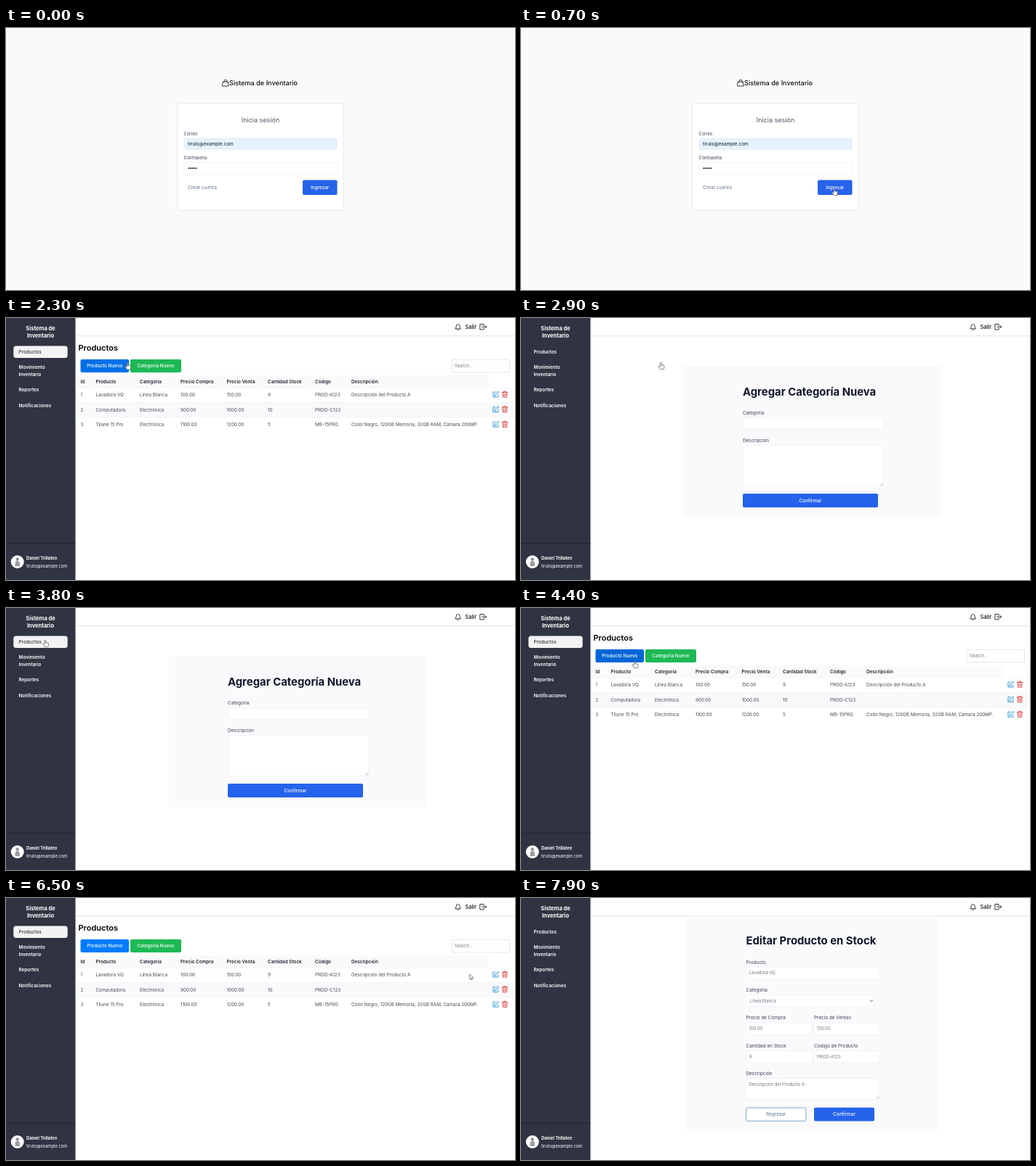
Write an HTML page that moves like this. It is 700 px wide and 361 px high and loops after 8 s.

```html
<!DOCTYPE html>
<html lang="es">
<head>
<meta charset="utf-8">
<title>Sistema de Inventario</title>
<style>
  html, body { margin: 0; width: 100%; height: 100%; overflow: hidden; background: #fff; }
  svg { display: block; width: 100%; height: 100%; }
  text { font: 400 6.3px Inter, "Open Sans", sans-serif; fill: #444a55; white-space: pre; }
  .label { font-size: 6.4px; fill: #374151; }
  .small { font-size: 5.7px; font-weight: 500; fill: #4b5563; }
  .value { font-size: 5.95px; fill: #717784; }
  .head { font-size: 6.35px; font-weight: 600; fill: #1f2430; }
  .title { font-size: 14.85px; font-weight: 700; fill: #0f172a; }
  .page-title { font-size: 11px; font-weight: 600; fill: #000; }
  .brand { font-size: 9.15px; font-weight: 500; fill: #111; }
  .welcome { font-size: 9px; fill: #4b5563; }
  .side { font-size: 7.5px; font-weight: 700; fill: #fff; }
  .nav { font-size: 6.4px; font-weight: 600; fill: #fff; }
  .nav.dark { font-weight: 500; fill: #333; }
  .user { font-size: 5.8px; font-weight: 700; fill: #fff; }
  .mail { font-size: 5.85px; fill: #fff; }
  .login { font-size: 6.5px; fill: #111827; }
  .muted { font-size: 6.5px; fill: #64748b; }
  .back { font-size: 6.4px; fill: #5b7590; }
  .button { font-size: 6.4px; font-weight: 500; fill: #fff; }
  .exit { font-size: 7.4px; font-weight: 500; fill: #111; }
  .mid { text-anchor: middle; }
  .field { fill: #fff; stroke: #e9ebef; stroke-width: .6; }
  .line { fill: none; stroke: #222; stroke-width: .9; stroke-linecap: round; stroke-linejoin: round; }

  /* One loop is 8 s, so 1.25% is 100 ms. */
  .login-page, .shell, .products, .category, .add, .edit, .pointer, .look, .hover, .new-product {
    animation: 8s -5ms step-end infinite;
  }
  .login-page { animation-name: login-page; }
  .shell { animation-name: shell; }
  .products { animation-name: products; }
  .category { animation-name: category; }
  .add { animation-name: add; }
  .edit { animation-name: edit; }
  .hover { animation-name: hover; }
  .new-product { animation-name: new-product; }
  .pointer { animation-name: move; }
  .look { animation-name: look, seen; }
  .hand { opacity: var(--hand); }
  .arrow { opacity: calc(1 - var(--hand)); }

  @keyframes login-page { 0% { visibility: visible } 11.25%, 100% { visibility: hidden } }
  @keyframes shell { 0% { visibility: hidden } 11.25%, 100% { visibility: visible } }
  @keyframes products {
    0%, 36.25%, 62.5%, 91.25%, 100% { visibility: hidden }
    11.25%, 53.75%, 73.75% { visibility: visible }
  }
  @keyframes category { 0%, 53.75%, 100% { visibility: hidden } 36.25% { visibility: visible } }
  @keyframes add { 0%, 73.75%, 100% { visibility: hidden } 62.5% { visibility: visible } }
  @keyframes edit { 0% { visibility: hidden } 91.25%, 100% { visibility: visible } }
  @keyframes hover {
    0%, 47.5%, 71.25% { opacity: 1 }
    36.25%, 62.5%, 91.25%, 100% { opacity: 0 }
    43.75%, 68.75% { opacity: 0; animation-timing-function: linear }
  }
  @keyframes new-product {
    0%, 30%, 73.75%, 100% { fill: #007bff }
    17.5% { fill: #007bff; animation-timing-function: steps(3) }
    21.25%, 57.5% { fill: #0056b3 }
    26.25% { fill: #0056b3; animation-timing-function: steps(3) }
    53.75% { fill: #0071ea; animation-timing-function: steps(1) }
    55% { fill: #0066d6; animation-timing-function: steps(2) }
  }
  @keyframes move {
    0% { transform: translate(330px, 196px); animation-timing-function: steps(6) }
    7.5% { transform: translate(431px, 221px) }
    13.75% { transform: translate(431px, 221px); animation-timing-function: steps(5) }
    20% { transform: translate(134.5px, 60px); animation-timing-function: steps(4) }
    25% { transform: translate(142px, 62px); animation-timing-function: steps(6) }
    32.5% { transform: translate(192.5px, 61px) }
    38.75% { transform: translate(192.5px, 61px); animation-timing-function: steps(5) }
    45% { transform: translate(54px, 44px) }
    52.5% { transform: translate(54px, 44px); animation-timing-function: steps(2) }
    55% { transform: translate(156.5px, 73px); animation-timing-function: steps(4) }
    60% { transform: translate(138px, 65px) }
    63.75% { transform: translate(138px, 65px); animation-timing-function: steps(6) }
    71.25% { transform: translate(66.5px, 49px) }
    72.5% { transform: translate(66.5px, 49px); animation-timing-function: steps(7) }
    81.25% { transform: translate(637.5px, 104.5px); animation-timing-function: steps(2) }
    83.75% { transform: translate(671px, 104px); animation-timing-function: steps(2) }
    86.25% { transform: translate(673px, 104px) }
    92.5% { transform: translate(673px, 104px); animation-timing-function: steps(4) }
    97.5%, 100% { transform: translate(380px, 215px) }
  }
  @keyframes look {
    0%, 11.25%, 40%, 53.75%, 65%, 73.75%, 93.75%, 100% { --hand: 0 }
    6.25%, 17.5%, 43.75%, 55%, 68.75%, 83.75% { --hand: 1 }
  }
  @keyframes seen { 0%, 98.75%, 100% { opacity: 0 } 1.25% { opacity: 1 } }
</style>
</head>
<body>
<svg id="stage" viewBox="0 0 700 361"></svg>
<script>
// Text is placed by its vertical centre; boxes by their edges.
const text = (x, y, words, style = '', rise = 2.25) =>
  `<text x="${x}" y="${y + rise}" class="${style}">${words}</text>`;
const box = (x1, y1, x2, y2, fill, radius = 0, extra = '') =>
  `<rect x="${x1}" y="${y1}" width="${x2 - x1}" height="${y2 - y1}" rx="${radius}" fill="${fill}" ${extra}/>`;
const field = (x1, y1, x2, y2) => box(x1, y1, x2, y2, '#fff', 2, 'class="field"');
const line = (d, extra = '') => `<path d="${d}" class="line" ${extra}/>`;
const group = (name, ...parts) => `<g class="${name}">${parts.join('')}</g>`;
const at = (x, y, content) => `<g transform="translate(${x} ${y})">${content}</g>`;
const button = (x1, y1, x2, y2, words, fill = '#2563eb', extra = '') =>
  box(x1, y1, x2, y2, fill, 2, extra) + text((x1 + x2) / 2, (y1 + y2) / 2, words, 'button mid');
const grip = (x, y) => line(`M${x - 4} ${y - 1}l3-3M${x - 2} ${y - 1}l1-1`, 'style="stroke:#777;stroke-width:.5"');

const mail = 'tirulo@example.com';
const washer = 'Lavadora VQ';
const panelFill = '#fafafc';

function loginPage() {
  const dots = [0, 1, 2, 3, 4].map(i => `<circle cx="${251.4 + i * 2.5}" cy="193.2" r=".95" fill="#111"/>`);
  return group('login-page',
    box(0, 0, 700, 361, panelFill),
    line('M298.7 74h6.6l.9 6h-8.4zM300 75.2v-1.8a2 2 0 0 1 4 0v1.8'),
    text(307, 75.5, 'Sistema de Inventario', 'brand', 3.2),
    box(235.8, 103.8, 464.3, 251.3, '#fff', 3, 'stroke="#e2e5ea" stroke-width=".8"'),
    text(350, 126.5, 'Inicia sesión', 'welcome mid', 3.2),
    text(244.5, 145.5, 'Correo', 'small', 2),
    box(244.5, 151.5, 456, 168, '#e8f0fe', 1.5),
    text(250, 159.7, mail, 'login'),
    text(244.5, 179.2, 'Contraseña', 'small', 2),
    field(244.8, 185.4, 455.7, 201.5), ...dots,
    text(250, 220, 'Crear cuenta', 'muted'),
    button(408, 209.5, 455.5, 230, 'Ingresar'));
}

function shell() {
  const links = [[46.7, 'Productos'], [68.2, 'Movimiento'], [77.3, 'Inventario'], [99, 'Reportes'], [120.3, 'Notificaciones']];
  return group('shell',
    box(0, 0, 700, 361, '#fff'),
    box(95.5, 24, 700, 25, '#e9e9ec'), box(95.5, 25, 700, 26, '#f8f8f9'),
    box(0, 0, 95.5, 361, '#303341'),
    text(47.5, 14, 'Sistema de', 'side mid', 2.6),
    text(47.5, 24.7, 'Inventario', 'side mid', 2.6),
    ...links.map(([y, words]) => text(17.5, y, words, 'nav')),
    group('hover', box(10.3, 38.4, 84.7, 55, '#f3f3f3', 3.5), text(17.5, 46.7, 'Productos', 'nav dark')),
    box(0, 310, 95.5, 310.8, '#1f222d'),
    '<circle cx="15.7" cy="336" r="9" fill="#fff"/>',
    '<circle cx="15.7" cy="332.5" r="2.2" fill="#8d8f92"/>',
    '<path d="M12.5 342v-4q0-3 3.2-3t3.2 3v4z" fill="#9b9da0"/>',
    text(28, 331, 'Daniel Trillateo', 'user', 2),
    text(28, 342, mail, 'mail', 2),
    line('M618 14.6q1.2-1.2 1.2-3.4a2.4 2.6 0 0 1 4.8 0q0 2.2 1.2 3.4zM620.6 16.2q1 .9 2 0'),
    text(631.5, 12.3, 'Salir', 'exit', 2.7),
    line('M657 10.4V8.5h-5.2v7.4h5.2V14M654.6 12.2h6M658.9 10.4l1.8 1.8-1.8 1.8'));
}

function productsPage() {
  const columns = [102.5, 123.5, 184, 240, 303.5, 360, 425, 475];
  const row = (y, cells, style) => cells.map((cell, i) => text(columns[i], y, cell, style)).join('');
  const rows = [
    [1, washer, 'Línea Blanca', '100.00', '150.00', 9, 'PROD-A123', 'Descripción del Producto A'],
    [2, 'Computadora', 'Electrónica', '900.00', '1000.00', 10, 'PROD-C123', ''],
    [3, 'Tilune 15 Pro', 'Electrónica', '1100.00', '1200.00', 5, 'MB-15PRO',
      'Color Negro, 120GB Memoria, 32GB RAM, Cámara 200MP.']
  ];
  const pencil = line('M-.6-3.2h-3v7h7V1M-1.6 1.8l.4-1.8 4.2-4.2 1.4 1.4L.2 1.4z', 'style="stroke:#2492d1"');
  const bin = line('M-3.8-2.8h7.6M-1.3-2.8v-1.4h2.6v1.4M-3-2.8l.4 6.8h5.2L3-2.8M-1-1v3.4M1-1v3.4', 'style="stroke:#e03c3c"');
  return group('products',
    text(99.5, 41, 'Productos', 'page-title', 4),
    button(102.5, 57, 169, 75, 'Producto Nuevo', '#007bff', 'class="new-product"'),
    button(171, 57, 241, 75, 'Categoria Nuevo', '#1db954'),
    box(613.3, 57.3, 692.5, 75, '#fff', 1.5, 'stroke="#d9dbdf" stroke-width=".7"'),
    text(617, 66, 'Search...', 'value', 2),
    box(96, 79, 664, 96, '#fafafa'),
    box(96, 116.5, 700, 137, '#f9f9fb'),
    ...[96, 116.3, 136.8].map(y => box(96, y, 700, y + .5, '#eceef1')),
    row(87.5, ['Id', 'Producto', 'Categoria', 'Precio Compra', 'Precio Venta', 'Cantidad Stock', 'Código', 'Descripción'], 'head'),
    ...rows.map((cells, i) => {
      const y = 106 + i * 20.6;
      return row(y, cells) + at(673.5, y - .8, pencil) + at(686, y - .8, bin);
    }));
}

function categoryPage() {
  return group('category',
    box(223, 66, 577.5, 275, panelFill),
    text(305, 101.3, 'Agregar Categoría Nueva', 'title', 5.2),
    text(305, 130.5, 'Categoría', 'label'),
    field(305, 138, 498.5, 153.5),
    text(305, 168.7, 'Descripción', 'label'),
    field(305, 175.8, 498.8, 231.3), grip(498.5, 231.3),
    button(305, 242, 491, 261, 'Confirmar'));
}

function productForm(name, title, { left, right, end, panel, pick, values }) {
  const [product, category, cost, price, stock, code, about] = values;
  const middle = 403;
  const pair = (y, first, second, a, b) =>
    text(left, y, first, 'label') + text(middle, y, second, 'label') +
    field(left, y + 7, 400.5, y + 23) + field(middle, y + 7, right, y + 23) +
    text(left + 4, y + 15, a, 'value') + text(middle + 4, y + 15, b, 'value');
  return group(name,
    box(panel[0], 25, panel[1], 321.5, panelFill),
    text(left, 59.2, title, 'title', 5.2),
    text(left, 88.5, 'Producto', 'label'),
    field(left, 95, right, 111.3),
    text(left + 4, 103.2, product, 'value'),
    text(left, 126.5, 'Categoria', 'label'),
    field(left, 133.8, end, 149.5),
    text(pick, 141.8, category, 'value'),
    line(`M${end - 5.7} 141l1.7 1.7 1.7-1.7`, 'style="stroke:#444"'),
    pair(165, 'Precio de Compra', 'Precio de Ventas', cost, price),
    pair(203.4, 'Cantidad en Stock', 'Codigo de Producto', stock, code),
    text(left, 241.5, 'Descripción', 'label'),
    field(left, 248.5, right, 277.5), grip(right - .5, 277.5),
    text(left + 4, 256.5, about, 'value'),
    box(left, 289, 392, 307.3, '#fff', 2, 'stroke="#5b8fbd" stroke-width=".8"'),
    text((left + 392) / 2, 298, 'Regresar', 'back mid'),
    button(middle, 288.7, end, 307.5, 'Confirmar'));
}

const pointer = group('pointer', group('look',
  '<path class="arrow" d="M0 0v7.6l1.7-1.6 1.2 2.6 1.1-.5-1.1-2.5h2.4z" fill="#fff" stroke="#333" stroke-width=".6"/>',
  '<path class="hand" d="M-1 1v5.2l-1.2-1.1c-.9-.4-1.5.4-1 1.2L-.8 9.6h4.4l.8-2.6V4.6c0-.9-1.2-1-1.3-.2 0-.9-1.3-1-1.4-.2 0-.9-1.2-1-1.3-.2V1C.4-.2-1-.2-1 1z" fill="#fff" stroke="#333" stroke-width=".6"/>'));

document.getElementById('stage').innerHTML = [
  shell(), productsPage(), categoryPage(),
  productForm('add', 'Agregar Producto en Stock', {
    left: 301.5, right: 505, end: 494, panel: [219.5, 581.5], pick: 307,
    values: ['', 'Seleccione una Categoria', '0', '0', '0', '', '']
  }),
  productForm('edit', 'Editar Producto en Stock', {
    left: 309.5, right: 493.5, end: 486, panel: [228, 572.5], pick: 315,
    values: [washer, 'Línea Blanca', '100.00', '150.00', '9', 'PROD-A123', 'Descripción del Producto A']
  }),
  loginPage(), pointer
].join('');
</script>
</body>
</html>
```
